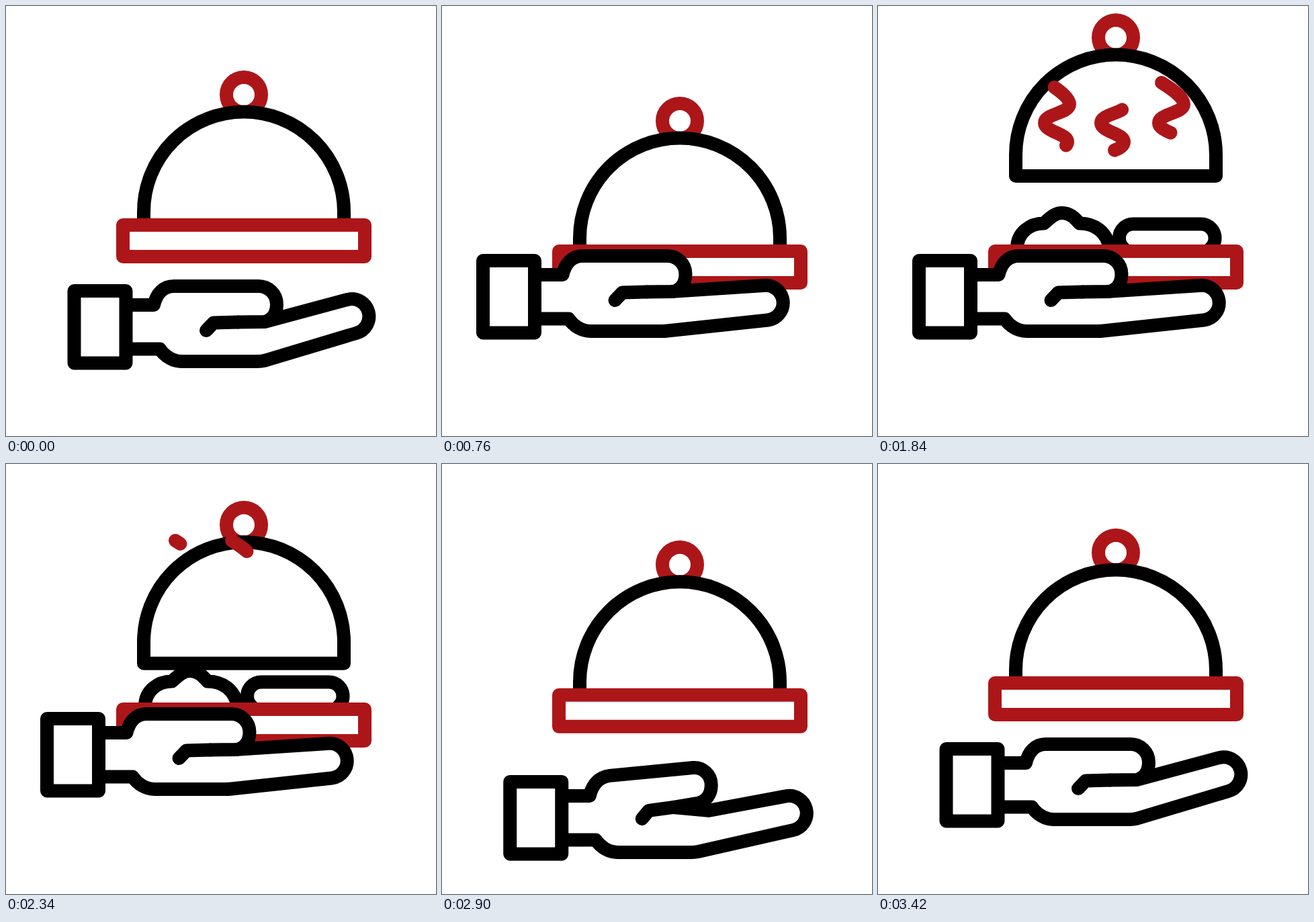
An HTML page for the animation above (3600 ms loop, 640 px wide and 640 px high).

```html
<!DOCTYPE html>
<html lang="en">
<head>
<meta charset="utf-8">
<title>Serving cloche</title>
<style>
  html, body { margin: 0; width: 100%; height: 100%; overflow: hidden; background: #fff; }
  svg { display: block; width: 100%; height: 100%; }
  .ink { fill: #fff; stroke: #000; stroke-width: 20; stroke-linecap: round; stroke-linejoin: round; }
  .red { stroke: #ad1619; }
  .open { fill: none; }
</style>
</head>
<body>
<svg viewBox="0 0 640 640">
  <g id="food" class="ink">
    <path d="M207 321.500C207 298.500 226 284.500 247 284.500C256 276.500 263 269 274 269S292 275.500 300 284.500C322 284.500 340 296.500 345 321.500"/>
    <rect x="359" y="285.500" width="142.500" height="42" rx="21"/>
  </g>
  <g id="cloche" class="ink">
    <circle class="red" cx="354" cy="132" r="26"/>
    <path d="M205 338V306.500A149 149 0 0 1 503 306.500V338Z"/>
  </g>
  <rect id="tray" class="ink red" x="174" y="326" width="360" height="47"/>
  <g id="hand" class="ink">
    <path id="palm"/>
    <path id="crease" class="open"/>
    <rect x="101.500" y="424" width="77" height="107.500"/>
  </g>
  <g id="steam" class="ink red open"></g>
</svg>
<script>
const LOOP = 3600;
const $ = id => document.getElementById(id);
const mix = (a, b, k) => a + (b - a) * k;

function ease(t, start, end) {
  const p = Math.min(1, Math.max(0, (t - start) / (end - start)));
  return p * p * (3 - 2 * p);
}

// Eased interpolation through [time, value] keys.
function track(t, keys) {
  let value = keys[0][1];
  for (let i = 1; i < keys.length; i++) {
    value = mix(value, keys[i][1], ease(t, keys[i - 1][0], keys[i][0]));
  }
  return value;
}

const move = (id, x, y) => $(id).setAttribute('transform', `translate(${x} ${y})`);

// Horizontal offset and the times at which each wisp starts to grow and to vanish.
const wisps = [[0, 1477, 1690], [84, 1577, 1780], [170, 1377, 1580]].map(([x, grow, fade]) => {
  const path = document.createElementNS('http://www.w3.org/2000/svg', 'path');
  path.setAttribute('d', 'M265 215.500C275 213 282 208 282 202C282 190 248 187 248 174' +
    'C248 160 285 160 285 146C285 136 268 124 252 114');
  path.setAttribute('transform', `translate(${x} 0)`);
  $('steam').append(path);
  return { path, grow, fade, length: path.getTotalLength() };
});

function drawWisp({ path, grow, fade, length }, t) {
  const head = ease(t, grow, grow + 440) * length;
  const tail = ease(t, fade, fade + 760) * length;
  path.style.display = head - tail > 0.1 ? '' : 'none';
  path.style.strokeDasharray = `${head - tail} ${length * 2}`;
  path.style.strokeDashoffset = -tail;
}

// drop lowers the finger, lift raises the thumb; both run from 0 to 1.
function drawHand(drop, lift) {
  const finger = (x0, y0, x1, y1) => `${mix(x0, x1, drop)} ${mix(y0, y1, drop)} `;
  const thumb = (x, y, dx, dy) => `${x + dx * lift} ${y + dy * lift} `;
  const fold = thumb(345, 470.5, 0, -8.5);
  const tipTop = finger(508, 437, 519, 461);
  const tipEnd = finger(521, 487, 525.5, 512.5);
  $('palm').setAttribute('d',
    'M178.5 445H220C' + thumb(224, 428, 0, 0) + thumb(234, 417, 0, 0) + thumb(250, 417, 0, -2) +
    'L' + thumb(376, 417, -2, -14) +
    'C' + thumb(390, 417, -2, -15) + thumb(403, 428, -2, -15) + thumb(403, 444, -2, -15) +
    'C' + thumb(403, 457, -2, -14) + thumb(396, 467, -3, -14) + thumb(385, 470, -4, -14) +
    'L' + fold +
    `L${385 - 4 * drop + 13.4 * lift} ${470 - 3 * lift}` +
    'L' + tipTop + 'A25.8 25.8 0 0 1 ' + tipEnd +
    'L' + finger(386, 527.5, 376, 528.5) + 'Q' + finger(380, 529, 372, 529) + finger(374, 529, 368, 529) +
    'H262C248 529 236 521 229 510.5H178.5');
  $('crease').setAttribute('d',
    'M' + fold + 'L' + thumb(309, 471.5, -1, -4.5) + 'L' + thumb(298, 483, 0, -4));
}

function draw(t) {
  const handKeys = (reach, hold, dip) =>
    track(t, [[0, 0], [400, reach], [760, hold], [2515, hold], [2920, dip], [3430, 0]]);
  const trayY = track(t, [[0, 0], [760, 39], [2515, 39], [3245, 0]]);
  const clocheLift = track(t, [[1060, 0], [1420, -124], [2185, -124], [2575, 0]]);

  move('tray', 0, trayY);
  move('food', 0, trayY);
  move('cloche', 0, trayY + clocheLift);
  move('hand', handKeys(-41, -40.5, 0), handKeys(-51, -45, 49.5));
  drawHand(handKeys(0.72, 1, 0.35), handKeys(0, 0, 1));
  wisps.forEach(wisp => drawWisp(wisp, t));
}

function tick() {
  draw(performance.now() % LOOP);
  requestAnimationFrame(tick);
}
tick();
</script>
</body>
</html>
```
